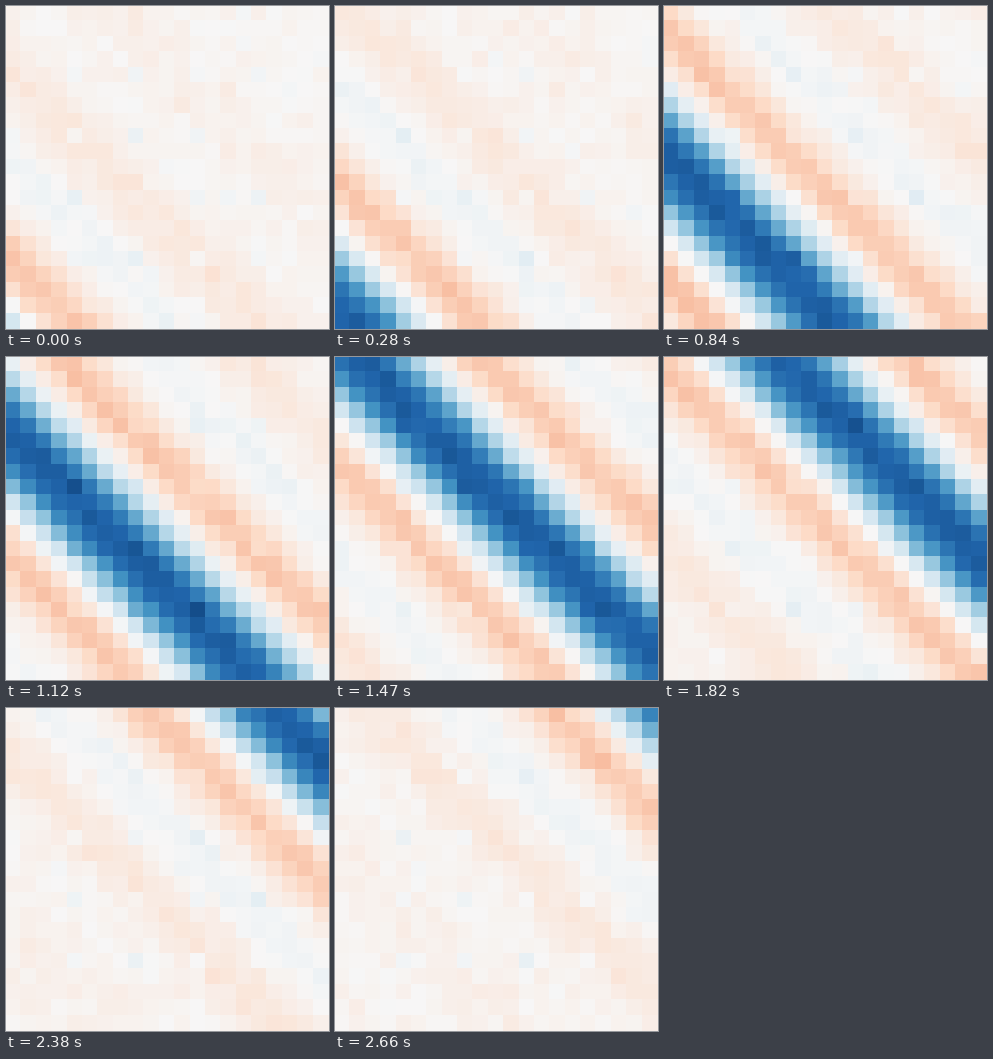
A matplotlib script for the animation above (2.73 s loop, 323 by 323 pixels).

```python
import numpy as np
import matplotlib.pyplot as plt
from matplotlib.animation import FuncAnimation

SIDE, CELLS, FRAMES, STEP_MS = 323, 21, 39, 70
START, SPEED = 371.0, 18.7  # crest offset in pixels, and pixels per frame

rng = np.random.default_rng(4)
centre = (np.arange(CELLS) + 0.5) * SIDE / CELLS
diagonal = centre[:, None] - centre[None, :]

# Cell index of each pixel; the grid starts one pixel before the stage
cell = np.minimum((np.arange(SIDE) + 1.5) * CELLS / SIDE, CELLS - 1).astype(int)
pixels = np.ix_(cell, cell)

# Steady texture with a sparse lattice of stronger cells, plus slight flicker
texture = rng.normal(0, 0.013, (CELLS, CELLS))
texture[4:17:4, 4:17:4] += 0.06
flicker = rng.normal(0, 0.009, (FRAMES, CELLS, CELLS))


def bump(x, mid, width, height, power=2):
    return height * np.exp(-np.abs((x - mid) / width) ** power)


def wave(u):
    """Blue crest with fading side lobes; the leading flank is steeper."""
    r = np.abs(u)
    core = bump(r, 0, np.where(u < 0, 56, 61), 0.835, power=2.4)
    lobes = (bump(r, 124, 38, -0.26) + bump(r, 220, 30, 0.05)
             + bump(r, 308, 42, -0.09) + bump(r, 475, 50, -0.035))
    return core + lobes - 0.015


def field(i):
    values = wave(diagonal - (START - SPEED * i)) + texture + flicker[i]
    return values[pixels]


fig = plt.figure(figsize=(SIDE / 100, SIDE / 100), dpi=100)
ax = fig.add_axes([0, 0, 1, 1])
ax.axis("off")
image = ax.imshow(field(0), cmap="RdBu", vmin=-1, vmax=1,
                  interpolation="nearest", aspect="auto")


def update(i):
    image.set_data(field(i))
    return [image]


anim = FuncAnimation(fig, update, frames=FRAMES, interval=STEP_MS,
                     repeat=True, repeat_delay=0, blit=False)
plt.show()
```
